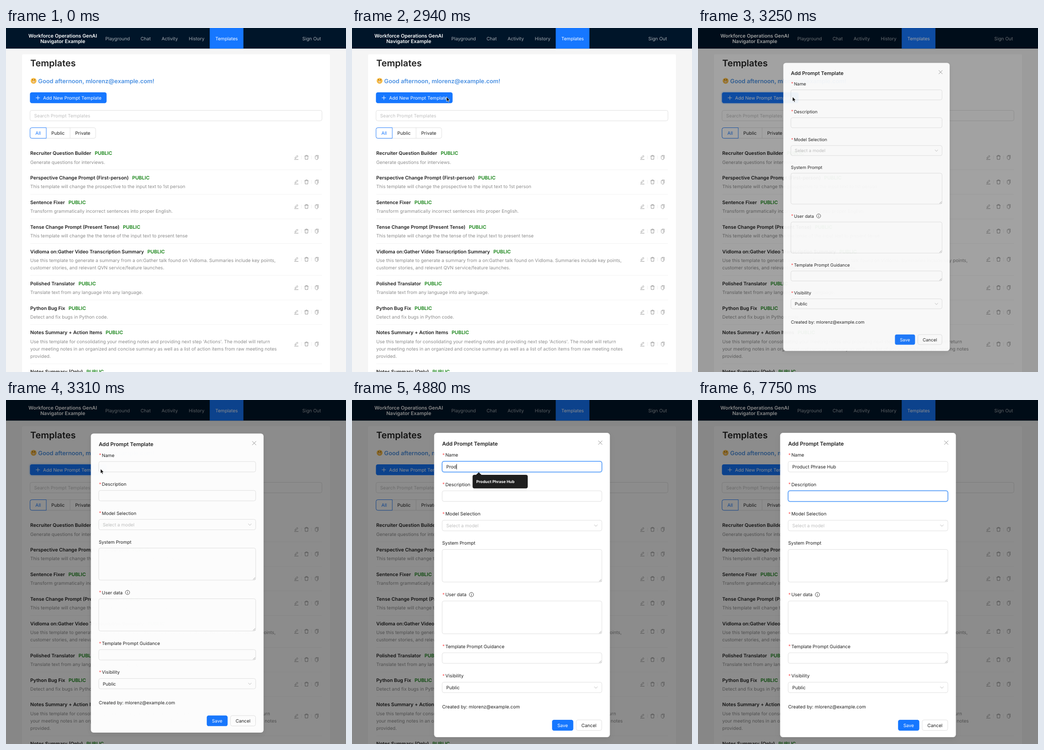
An HTML page for the animation above (8000 ms loop, 743 px wide and 754 px high).

```html
<!DOCTYPE html>
<html lang="en">
<head>
<meta charset="utf-8">
<title>Templates</title>
<style>
  html, body { margin: 0; width: 100%; height: 100%; overflow: hidden; }
  svg { display: block; width: 743px; height: 754px; background: #f5f5f5; }
  text { font-family: Inter, "Open Sans", sans-serif; text-rendering: geometricPrecision; white-space: pre; }
</style>
</head>
<body>
<svg id="stage" viewBox="0 0 743 754"></svg>
<script>
const LOOP = 8000;
const BLUE = '#1677ff', INK = '#1f1f1f', GREY = '#8c8c8c', BORDER = '#d9d9d9';
const EMAIL = 'mlorenz@example.com';
const NAME = 'Product Phrase Hub';
const KEY_TIMES = [4310, 4500, 4630, 4750, 5000, 5190, 5250, 5440, 5560,
                   5630, 5690, 5750, 5880, 5940, 6060, 6250, 6380, 6560];

// y is the vertical middle of the capitals
const text = (x, y, s, { size = 10.08, weight = 400, fill = INK, anchor = 'start', id = '' } = {}) =>
  `<text id="${id}" x="${x}" y="${y + size * .36}" font-size="${size}" font-weight="${weight}" fill="${fill}" text-anchor="${anchor}">${s}</text>`;
const rect = (x1, y1, x2, y2, fill, r = 0, extra = '') =>
  `<rect x="${x1}" y="${y1}" width="${x2 - x1}" height="${y2 - y1}" rx="${r}" fill="${fill}" ${extra}/>`;
const box = (x1, y1, x2, y2, stroke = BORDER, r = 4) =>
  rect(x1, y1, x2, y2, '#fff', r, `stroke="${stroke}" stroke-width=".8"`);
const path = (d, stroke, width = .9, extra = '') =>
  `<path d="${d}" fill="none" stroke="${stroke}" stroke-width="${width}" ${extra}/>`;

const templates = [
  ['Recruiter Question Builder', 'Generate questions for interviews.'],
  ['Perspective Change Prompt (First-person)', 'This template will change the prospective to the input text to 1st person'],
  ['Sentence Fixer', 'Transform grammatically incorrect sentences into proper English.'],
  ['Tense Change Prompt (Present Tense)', 'This template will change the the tense of the input text to present tense'],
  ['Vidloma on:Gather Video Transcription Summary',
    'Use this template to generate a summary from a on:Gather talk found on Vidloma. Summaries include key points,',
    'customer stories, and relevant QVN service/feature launches.'],
  ['Polished Translator', 'Translate text from any language into any language.'],
  ['Python Bug Fix', 'Detect and fix bugs in Python code.'],
  ['Notes Summary + Action Items',
    "Use this template for consolidating your meeting notes and providing next step 'Actions'. The model will return",
    'your meeting notes in an organized and concise summary as well as a list of action items from raw meeting notes',
    'provided.'],
  ['Notes Summary (Only)', '']
];

function header() {
  const soft = { fill: '#a6adb4' };
  const brand = { size: 10.8, weight: 600, fill: '#fff', anchor: 'middle' };
  return rect(0, 0, 743, 45.2, '#001529') + rect(445.2, 0, 518.8, 45.2, BLUE) +
    text(124, 17, 'Workforce Operations GenAI', brand) + text(124, 29, 'Navigator Example', brand) +
    [[217, 'Playground'], [294, 'Chat'], [340, 'Activity'], [399.5, 'History'], [647.5, 'Sign Out']]
      .map(([x, s]) => text(x, 23, s, soft)).join('') +
    text(457.5, 23, 'Templates', { fill: '#fff' });
}

function rowIcons(y) {
  return `<g transform="translate(0 ${y})">` +
    path('M630 4.6h9M631.5 2.3l.4-2.1 4.4-4.4 1.7 1.7-4.4 4.4z', GREY) +
    path('M652.4-2.8h8.6M653.4-2.8l.5 7.2h5.6l.5-7.2M654.9-2.8v-1.7h3.6v1.7', GREY) +
    path('M675.7-3h5v7.8h-2.9l-2.1-2.1zM677-4.5h5.5v7.5', GREY, .8) +
    path('M645.7-4v8M667.7-4v8', '#ececec') + '</g>';
}

function templateList() {
  let y = 274.6, out = '';
  for (const [title, ...lines] of templates) {
    const extra = lines.length - 1;
    out += text(53, y, `${title}<tspan dx="7.5" fill="#108010">PUBLIC</tspan>`, { size: 10.5, weight: 600 });
    lines.forEach((s, i) => out += text(53, y + 19.3 + 16.1 * i, s, { fill: GREY }));
    out += rowIcons(y + 9 + 8 * extra);
    y += 53.85 + 16.1 * extra;
    out += path(`M53 ${y - 17.7}H690.5`, '#f0f0f0', .8);
  }
  return out;
}

function page() {
  const mid = { anchor: 'middle' };
  return header() + rect(35, 57.5, 708, 760, '#fff', 3) +
    text(53, 77, 'Templates', { size: 19.8, weight: 600 }) +
    '<circle cx="60.3" cy="115.8" r="6.4" fill="#fbbf45"/>' +
    '<circle cx="58" cy="113.6" r="1" fill="#6b3d12"/><circle cx="62.6" cy="113.6" r="1" fill="#6b3d12"/>' +
    rect(57.3, 116.6, 63.3, 119.2, '#fff3dc', 1.3, 'stroke="#a8641c" stroke-width=".6"') +
    text(70.3, 116, `Good afternoon, ${EMAIL}!`, { size: 12.8, weight: 600, fill: '#4a90e2' }) +
    rect(52.3, 140.9, 219.8, 164.7, BLUE, 4.2) +
    path('M65.2 153h9M69.7 148.5v9', '#fff', 1) +
    text(81, 153, 'Add New Prompt Template', { fill: '#fff' }) +
    box(52.5, 180.5, 690.5, 203.5) + text(61.5, 192.5, 'Search Prompt Templates', { fill: '#bfbfbf' }) +
    box(52.5, 218.5, 196, 241.8) + path('M140 218.5v23.3', BORDER, .8) +
    path('M88 218.5H56.5a4 4 0 0 0-4 4v15.3a4 4 0 0 0 4 4H88z', BLUE) +
    text(70.2, 230.3, 'All', { ...mid, fill: BLUE }) + text(113.7, 230.3, 'Public', mid) + text(167.7, 230.3, 'Private', mid) +
    templateList();
}

function field(y1, y2, resizable) {
  return box(197, y1, 546, y2) +
    (resizable ? path(`M540 ${y2 - 1}l5-5M543 ${y2 - 1}l2-2`, '#777', .7) : '');
}
const label = (y, s) => text(197.5, y - .5, '*', { fill: '#ff4d4f' }) + text(204, y, s);
const chevron = y => path(`M529.5 ${y - 1.8}l3.5 3.8 3.5-3.8`, '#b5b5b5');
const focusRing = (id, y) => `<g id="${id}">` +
  rect(196, y - 1, 547, y + 24.3, 'none', 5, 'stroke="#0591ff" stroke-opacity=".14" stroke-width="1.8"') +
  rect(197, y, 546, y + 23.3, 'none', 4, `stroke="${BLUE}"`) + '</g>';

function modal() {
  return rect(179.5, 72, 563.5, 739, '#fff', 6, 'filter="url(#shadow)"') +
    text(197, 96, 'Add Prompt Template', { size: 11.65, weight: 600 }) +
    path('M538.3 89.2l8.6 8.6M546.9 89.2l-8.6 8.6', GREY, 1) +
    label(120.7, 'Name') + field(134.5, 157.8) +
    label(185.2, 'Description') + field(199, 222.3) +
    label(249.8, 'Model Selection') + field(263.5, 286.8) + chevron(275) +
    text(206, 275.3, 'Select a model', { fill: '#bfbfbf' }) +
    text(197, 313.8, 'System Prompt') + field(327.5, 399, true) +
    label(426.7, 'User data') + field(440.5, 512.5, true) +
    '<circle cx="261" cy="426.5" r="4.7" fill="none" stroke="#333" stroke-width=".9"/>' +
    path('M261 425.8v3.2M261 423.7v1', '#333', 1) +
    label(540.2, 'Template Prompt Guidance') + field(554, 577.2, true) +
    label(604.7, 'Visibility') + field(618.5, 641.5) + chevron(630) + text(206, 630.2, 'Public') +
    text(197, 672, `Created by: ${EMAIL}`) +
    rect(437.2, 700.9, 483.6, 724.7, BLUE, 4.2) + text(460.3, 713.2, 'Save', { fill: '#fff', anchor: 'middle' }) +
    box(490, 701.2, 545.8, 724.3) + text(517.8, 713.2, 'Cancel', { anchor: 'middle' }) +
    focusRing('nameRing', 134.5) + focusRing('descRing', 199) +
    text(206, 146.2, '', { id: 'typed' }) + rect(0, 0, .9, 12, '#111', 0, 'id="caret"') +
    '<g id="tooltip"><path d="M270.5 164.5l6.5-6 6.5 6z" fill="#1f1f1f"/>' +
    rect(263.5, 164, 384, 193.7, '#1f1f1f', 4) +
    text(271.5, 179.3, NAME, { size: 8.6, weight: 700, fill: '#fff' }) + '</g>';
}

const $ = id => document.getElementById(id);
$('stage').innerHTML =
  '<defs><filter id="shadow" x="-10%" y="-10%" width="120%" height="120%">' +
  '<feDropShadow dx="0" dy="4" stdDeviation="6" flood-opacity=".08"/></filter></defs>' +
  page() +
  rect(52.5, 141, 219.5, 164.5, 'none', 4.2, `id="wave" stroke="${BLUE}"`) +
  rect(0, 0, 743, 754, '#000', 0, 'id="mask"') +
  `<g id="modal">${modal()}</g>` +
  '<path id="cursor" d="M0 0V10L2.4 7.8 4 11.4 5.7 10.7 4.2 7.2H7.3Z" fill="#000" stroke="#fff" stroke-width=".8"/>';

const ramp = (t, a, b) => Math.min(1, Math.max(0, (t - a) / (b - a)));

// cubic-bezier(.08, .82, .17, 1)
function easeOutCirc(x) {
  let lo = 0, hi = 1;
  for (let i = 0; i < 24; i++) {
    const u = (lo + hi) / 2, v = 1 - u;
    if (3 * v * v * u * .08 + 3 * v * u * u * .17 + u * u * u < x) lo = u; else hi = u;
  }
  const v = 1 - lo;
  return 3 * v * v * lo * .82 + 3 * v * lo * lo + lo ** 3;
}

// time, x, y
const mousePath = [[60, 665, 756], [810, 415, 600], [1380, 250, 235], [1690, 227.5, 168],
                   [2150, 224, 164], [2600, 206.5, 151], [3450, 206.5, 151], [3850, 216, 147]];
function mouseAt(t) {
  const i = mousePath.findIndex(p => p[0] > t);
  if (i < 0) return mousePath.at(-1).slice(1);
  if (i === 0) return mousePath[0].slice(1);
  const [t0, x0, y0] = mousePath[i - 1], [t1, x1, y1] = mousePath[i];
  const k = ramp(t, t0, t1), e = i < 4 ? k : k * k * (3 - 2 * k);
  return [x0 + (x1 - x0) * e, y0 + (y1 - y0) * e];
}

const show = (id, on) => $(id).setAttribute('visibility', on ? 'visible' : 'hidden');
const fade = (id, o) => $(id).setAttribute('opacity', o);

function draw(t) {
  const OPEN = 3122, CLICK = 3900, TAB = 7000;
  const grow = t < OPEN ? 0 : easeOutCirc(ramp(t, OPEN, OPEN + 310));
  const shift = t < 3440 ? 5.5 : 0;
  fade('mask', .45 * ramp(t, OPEN, OPEN + 160));
  fade('modal', grow);
  $('modal').setAttribute('transform',
    `translate(${207 + shift} 154) scale(${.2 + .8 * grow}) translate(-207 -154)`);

  const spread = ramp(t, OPEN - 40, OPEN + 360);
  fade('wave', spread > 0 ? .25 * (1 - spread) : 0);
  $('wave').setAttribute('stroke-width', 8 * Math.sqrt(spread));

  const [x, y] = mouseAt(t);
  $('cursor').setAttribute('transform', `translate(${x} ${y})`);
  show('cursor', t >= 60 && t < KEY_TIMES[0]);

  const moved = ramp(t, TAB, TAB + 130);
  fade('nameRing', ramp(t, CLICK, CLICK + 150) * (1 - moved));
  fade('descRing', moved);

  $('typed').textContent = NAME.slice(0, KEY_TIMES.filter(k => k <= t).length);
  const inName = t < TAB;
  $('caret').setAttribute('x', 206 + (inName ? $('typed').getComputedTextLength() : 0));
  $('caret').setAttribute('y', inName ? 140.2 : 204.7);
  show('caret', t >= CLICK && t < TAB + 500);
  show('tooltip', t >= KEY_TIMES[0] && t < KEY_TIMES.at(-1));
}

const start = performance.now();
function tick() {
  draw((performance.now() - start) % LOOP);
  requestAnimationFrame(tick);
}
tick();
</script>
</body>
</html>
```
